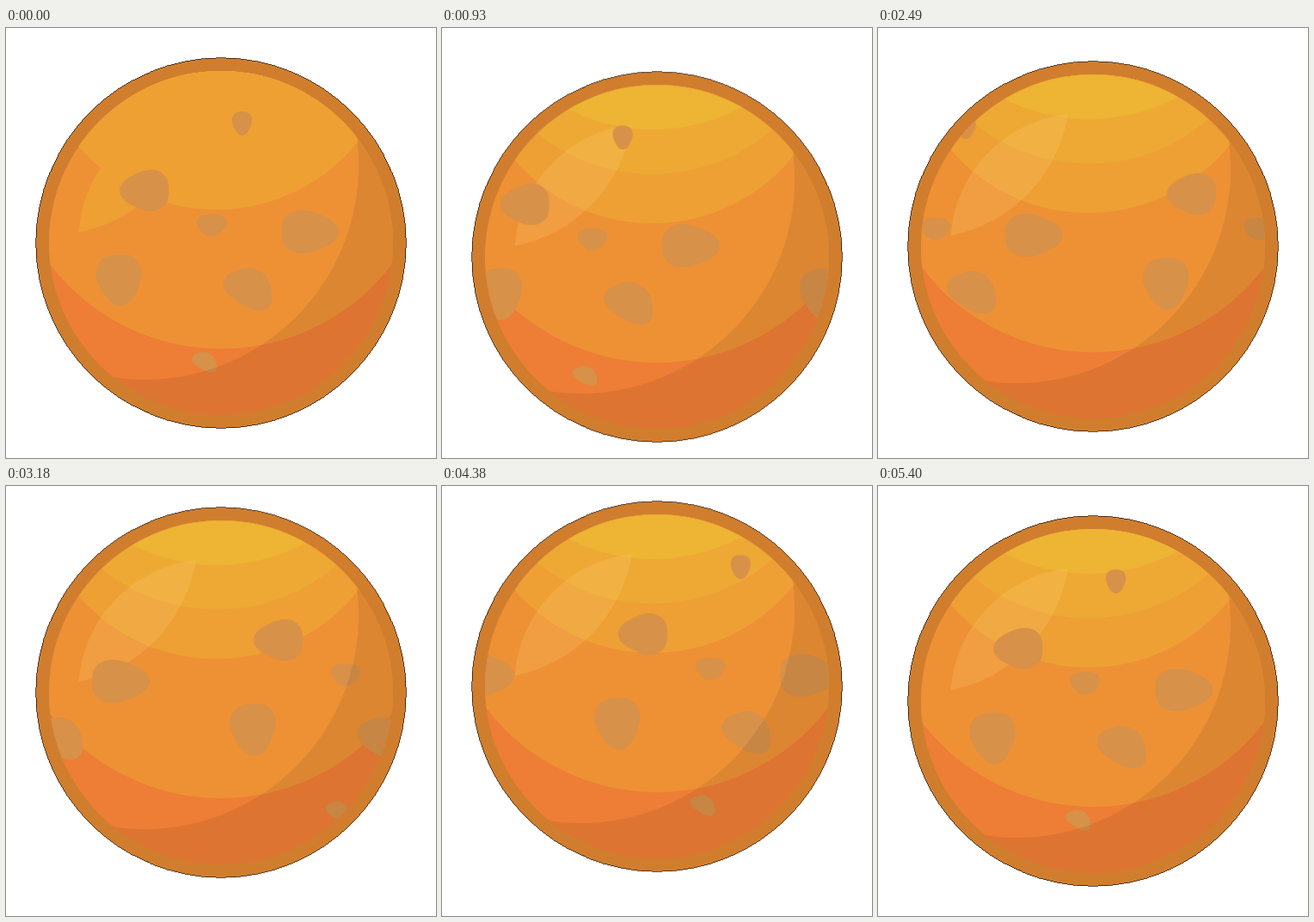
Animation of 500 by 500 pixels, one loop 5.43 s. Source, as an HTML page:

```html
<!DOCTYPE html>
<html lang="en">
<head>
<meta charset="utf-8">
<title>Orange planet</title>
<style>
  html, body { margin: 0; width: 100%; height: 100%; overflow: hidden; background: #fff; }
  svg { display: block; width: 100vw; height: 100vh; }
  svg * { animation-duration: 5430ms; animation-iteration-count: infinite; }

  .planet { animation-name: bob; }
  .craters { animation-name: spin; animation-timing-function: steps(181); fill: #d79149; }
  .flat { animation-name: flat; animation-timing-function: step-end; fill: #eea033; }
  .shine { fill: #ffdc8c; fill-opacity: .16; }

  @keyframes bob {
    0% { transform: translateY(0); animation-timing-function: cubic-bezier(.167, .167, .667, 1); }
    24.31% { transform: translateY(19px); animation-timing-function: cubic-bezier(.333, 0, .667, 1); }
    74.59% { transform: translateY(-19px); animation-timing-function: cubic-bezier(.333, 0, .833, .833); }
    99.45%, 100% { transform: translateY(0); }
  }
  @keyframes spin {
    from { transform: translateX(0); }
    to { transform: translateX(-376px); }
  }
  /* The loop opens with one flat-toned instant before the bands and shine appear. */
  @keyframes flat { 0% { opacity: 1; } .5525%, 100% { opacity: 0; } }
</style>
</head>
<body>
<svg viewBox="0 0 500 500">
  <defs>
    <clipPath id="disc"><circle cx="250" cy="250" r="200"/></clipPath>
    <path id="leaf" d="M84.5 237.5A153 153 0 0 1 221 96A172 172 0 0 1 84.5 237.5Z"/>
    <g id="spots"></g>
  </defs>
  <g class="planet">
    <circle cx="250" cy="250" r="215.3" fill="#d07e2e" stroke="#140b04" stroke-width=".7" shape-rendering="crispEdges"/>
    <g clip-path="url(#disc)">
      <circle cx="250" cy="250" r="202" fill="#ee7d36"/>
      <circle cx="250" cy="122.5" r="250.5" fill="#ee9135"/>
      <circle cx="244.5" cy="0" r="211" fill="#eea035"/>
      <circle cx="245" cy="-60" r="213.7" fill="#eea935"/>
      <circle cx="245.5" cy="-115" r="217" fill="#eeb434"/>
      <use class="shine" href="#leaf"/>
      <g class="flat">
        <circle cx="244.5" cy="0" r="211"/>
        <use href="#leaf"/>
      </g>
      <g class="craters">
        <use href="#spots"/>
        <use href="#spots" x="376"/>
      </g>
      <path fill="#000" fill-opacity=".07" fill-rule="evenodd"
        d="M0 0H500V500H0ZM-88 160a249 249 0 0 0 498 0a249 249 0 0 0 -498 0Z"/>
    </g>
  </g>
</svg>
<script>
  const spots = document.getElementById('spots');

  // A rough ellipse with three soft corners; the first corner points along the tilt.
  function crater(x, y, rx, ry, tilt) {
    const points = Array.from({ length: 60 }, (_, i) => {
      const a = i * Math.PI / 30;
      const r = 1 + .08 * Math.cos(3 * a);
      return [rx * r * Math.cos(a), ry * r * Math.sin(a)];
    });
    const shape = document.createElementNS('http://www.w3.org/2000/svg', 'polygon');
    shape.setAttribute('points', points.join(' '));
    shape.setAttribute('transform', `translate(${x} ${y}) rotate(${tilt})`);
    spots.append(shape);
  }

  crater(163, 189, 28.5, 23.5, 180);
  crater(274.5, 110, 14, 11.3, 90);
  crater(239, 228.5, 13, 17, 90);
  crater(351, 237, 33.5, 24.5, 0);
  crater(131.5, 291, 30, 26, 85);
  crater(283, 303, 22, 30, -60);
  crater(231.5, 388, 10, 15.5, -60);
</script>
</body>
</html>
```
